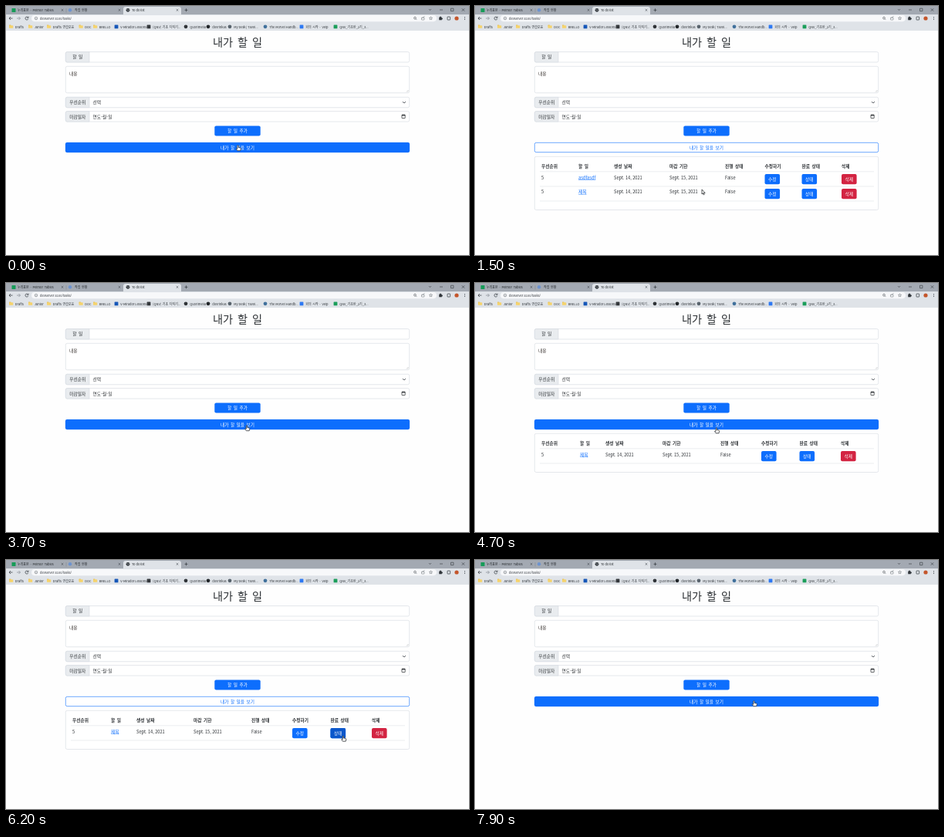
An HTML page with a canvas for the animation above (8 s loop, 600 px wide and 323 px high).

```html
<!DOCTYPE html>
<html lang="ko">
<head>
<meta charset="utf-8">
<title>To do list</title>
<style>
html, body { margin: 0; width: 100%; height: 100%; overflow: hidden; background: #fefefe; }
canvas { display: block; width: 600px; height: 323px; }
</style>
</head>
<body>
<canvas id="stage"></canvas>
<script>
const W = 600, H = 323, LOOP = 8000;
const canvas = document.getElementById('stage');
const ctx = canvas.getContext('2d');
const dpr = Math.max(1, window.devicePixelRatio || 1);
canvas.width = W * dpr;
canvas.height = H * dpr;

const BLUE = '#0d6efd', INK = '#2b2f33', LINE = '#d3d9df';
const VIEW = [77, 177, 446, 13];

// Pointer tip: time, x, y
const PATH = [
  [0, 300.5, 180.5], [850, 300.5, 180.5], [1200, 297, 214], [1500, 294, 238],
  [1750, 295, 238.5], [2200, 484, 224], [2700, 484, 224], [3100, 415, 221],
  [3400, 330, 185], [3700, 312, 184.5], [4600, 312, 184.5], [5000, 317, 204],
  [5500, 392, 227], [6100, 437, 228], [6650, 437, 228], [6950, 424, 238],
  [7500, 377, 209], [7850, 361.5, 182.5], [8000, 361.5, 182.5]
];

const LISTS = [
  { cols: [86, 134, 180, 252, 324, 375.5, 423.5, 475], rows: ['asdfasdf', '제목'],
    from: 180, to: 3250, press: 2600, pick: 7 },
  { cols: [86, 136, 169, 243, 318, 371, 420.5, 474], rows: ['제목'],
    from: 4020, to: 7250, press: 6400, pick: 6 }
];
const HEADS = ['우선순위', '할 일', '생성 날짜', '마감 기한', '진행 상태', '수정하기', '완료 상태', '삭제'];
const ACTIONS = { 5: '수정', 6: '상태', 7: '삭제' };

const clamp = (v, a = 0, b = 1) => Math.min(b, Math.max(a, v));
const ease = p => p * p * (3 - 2 * p);
const within = (t, a, b) => t >= a && t < b;

function pointer(t) {
  let i = 1;
  while (i < PATH.length - 1 && PATH[i][0] <= t) i++;
  const [t0, x0, y0] = PATH[i - 1], [t1, x1, y1] = PATH[i];
  const p = ease(clamp((t - t0) / (t1 - t0)));
  return [x0 + (x1 - x0) * p, y0 + (y1 - y0) * p];
}

function over([x, y, w, h], t) {
  const [px, py] = pointer(Math.max(0, t));
  return px >= x && px <= x + w && py >= y && py <= y + h;
}

// Hover amount, softened over a short fade
function heat(box, t) {
  let n = 0;
  for (let i = 0; i < 5; i++) n += over(box, t - i * 30);
  return n / 5;
}

function text(s, x, y, size = 5.7, color = INK, align = 'left', weight = 400) {
  ctx.font = `${weight} ${size}px "Noto Sans CJK KR", "Noto Sans CJK", "Noto Sans CJK JP", sans-serif`;
  ctx.wordSpacing = /[가-힣]/.test(s) ? size * 0.2 + 'px' : '0px';
  ctx.textAlign = align;
  ctx.textBaseline = 'middle';
  ctx.fillStyle = color;
  ctx.fillText(s, x, y);
}

function rect(x, y, w, h, r, fill, stroke, lw = 0.6) {
  ctx.beginPath();
  ctx.roundRect(x, y, w, h, r);
  if (fill) { ctx.fillStyle = fill; ctx.fill(); }
  if (stroke) { ctx.strokeStyle = stroke; ctx.lineWidth = lw; ctx.stroke(); }
}

function dot(x, y, r, fill) {
  ctx.beginPath();
  ctx.arc(x, y, r, 0, Math.PI * 2);
  ctx.fillStyle = fill;
  ctx.fill();
}

function ring(x, y, r, color, a = 0, b = Math.PI * 2, lw = 0.7) {
  ctx.beginPath();
  ctx.arc(x, y, r, a, b);
  ctx.strokeStyle = color;
  ctx.lineWidth = lw;
  ctx.stroke();
}

function line(color, lw, ...p) {
  ctx.beginPath();
  for (let i = 0; i < p.length; i += 2) ctx.lineTo(p[i], p[i + 1]);
  ctx.strokeStyle = color;
  ctx.lineWidth = lw;
  ctx.stroke();
}

function cross(x, y, r, color, lw = 0.6) {
  line(color, lw, x - r, y - r, x + r, y + r);
  line(color, lw, x - r, y + r, x + r, y - r);
}

function tabs(loading) {
  rect(0, 0, W, 12, 0, '#a3a9b2');
  rect(152, 1, 75, 13, [3, 3, 0, 0], '#dfe3e8');
  rect(7.5, 3, 5, 5, 0.5, '#169c58');
  text('누리표본 - Pelmor Tables', 15, 5.3, 4, '#24282c');
  cross(73, 5.3, 1.3, '#41464c');
  line('#7c828a', 0.5, 78, 3, 78, 8.5);
  dot(83, 5.3, 2.2, '#6d93cf');
  text('작업 현황', 89, 5.3, 4, '#24282c');
  cross(147, 5.3, 1.3, '#41464c');
  if (!loading) {
    dot(158, 5.3, 2.4, '#33383d');
    line('#dfe3e8', 0.5, 156.5, 4.5, 158.2, 5.6, 159.8, 4.8);
  }
  text('To do list', 163, 5.3, 4, '#24282c');
  cross(222, 5.3, 1.3, '#41464c');
  line('#30353a', 0.7, 231.5, 5.3, 235.5, 5.3);
  line('#30353a', 0.7, 233.5, 3.3, 233.5, 7.3);
  line('#30353a', 0.6, 548, 4, 549.5, 5.5, 551, 4);
  line('#30353a', 0.6, 562, 5, 566, 5);
  rect(576.5, 3.2, 3.4, 3.4, 0, null, '#30353a');
  cross(592.5, 5, 1.7, '#30353a');
}

function toolbar(loading) {
  rect(0, 11, W, 21, 0, '#dfe3e8');
  const c = '#3f454b';
  line(c, 0.8, 8.5, 16, 4, 16);
  line(c, 0.8, 6, 14, 4, 16, 6, 18);
  line('#8d949b', 0.8, 14, 16, 18.5, 16);
  line('#8d949b', 0.8, 16.5, 14, 18.5, 16, 16.5, 18);
  if (loading) cross(27, 16, 1.8, c, 0.8);
  else {
    ring(27, 16, 2, c, 0.4, 5.5, 0.8);
    line(c, 0.8, 29, 13.6, 29, 15.4, 27.2, 15.4);
  }
  rect(33, 12, 525, 8.2, 4.1, '#f7f8fa');
  ring(39, 16, 1.8, '#555b61', 0, 7, 0.5);
  line('#555b61', 0.5, 39, 15.6, 39, 17);
  text('devserver:4100/tasks/', 44, 16, 4, '#34393e');
  ring(530, 15.6, 1.4, c, 0, 7, 0.6);
  line(c, 0.6, 531, 16.6, 532.2, 17.8);
  rect(538.5, 15, 3.5, 3, 0.4, null, '#5b6167', 0.5);
  line('#5b6167', 0.5, 539.5, 15.5, 542.5, 13.5);
  ctx.beginPath();
  for (let i = 0; i < 10; i++) {
    const a = i * Math.PI / 5 - Math.PI / 2, r = i % 2 ? 1 : 2.2;
    ctx.lineTo(550.5 + r * Math.cos(a), 16 + r * Math.sin(a));
  }
  ctx.closePath();
  ctx.strokeStyle = '#5b6167';
  ctx.lineWidth = 0.5;
  ctx.stroke();
  rect(561.2, 14.6, 3.6, 3.6, 0.5, '#30353a');
  dot(563, 14.4, 0.9, '#30353a');
  dot(565, 16.4, 0.9, '#30353a');
  rect(572, 14, 3.6, 4, 0.4, null, '#30353a', 0.7);
  dot(584, 16, 2.6, '#c4562c');
  for (let i = -1; i < 2; i++) dot(594.5, 16 + i * 1.6, 0.5, c);
}

function folder(x, s) {
  rect(x - 2.5, 24.6, 2.5, 2, 0.5, '#e8bd4c');
  rect(x - 2.5, 25.2, 5.2, 3.6, 0.5, '#f5d36d');
  text(s, x + 5.2, 27, 4, '#2d3237');
}

function bookmark(x, color, s, square) {
  if (square) rect(x - 2.4, 24.4, 4.8, 4.8, 0.5, color);
  else dot(x, 26.8, 2.4, color);
  text(s, x + 5.2, 27, 4, '#2d3237');
}

function bookmarks() {
  folder(6.5, 'Drafts');
  folder(31.5, 'Junior');
  folder(55.5, 'Drafts 연습모음');
  folder(97, 'DOC');
  folder(115.5, 'BRELLO');
  bookmark(143, '#1657b8', 'V-Mirador Lessons', true);
  bookmark(185, '#34383c', '[QNV] 기초 다지기...', true);
  bookmark(233, '#2f3337', 'Quorimella');
  bookmark(262, '#22262a', 'dovrinkas');
  bookmark(290, '#59646e', 'My Desk | Tavol...');
  bookmark(336, '#41719c', 'The Morvel Handb...');
  bookmark(383, '#2d79f3', '회의 시작 - Velp', true);
  bookmark(427, '#1b9e5a', 'QNV_기초반_2기_3...', true);
}

function field(y, label) {
  rect(77.3, y, 445.4, 13.4, 2, '#fff', LINE);
  rect(77.3, y, 30.7, 13.4, [2, 0, 0, 2], '#e9ecef', LINE);
  text(label, 92.7, y + 6.8, 5.7, INK, 'center');
}

function form() {
  text('내가 할 일', 300, 46.3, 14.2, INK, 'center');
  field(59.5, '할 일');
  rect(77.3, 78.3, 445.4, 34.4, 2, '#fff', LINE);
  text('내용', 82, 88.2, 5.7, '#3b3531');
  line('#8a8f94', 0.4, 519, 111.5, 521.5, 109);
  line('#8a8f94', 0.4, 520.5, 111.5, 521.5, 110.5);
  field(118.3, '우선순위');
  text('선택', 112.5, 125.2);
  line('#343a40', 0.8, 514, 124, 516, 126, 518, 124);
  field(136.6, '마감일자');
  text('연도-월-일', 112.5, 143.5);
  rect(513, 141.2, 4.2, 4.4, 0.4, null, '#202428', 0.7);
  line('#202428', 1.2, 513, 141.7, 517.2, 141.7);
  rect(270.3, 155.5, 59.4, 13, 2, BLUE);
  text('할 일 추가', 300, 162, 5.7, '#fff', 'center');
}

function viewButton(t) {
  const [x, y, w, h] = VIEW, k = heat(VIEW, t);
  const down = within(t, 100, 200) || within(t, 4000, 4100);
  rect(x + 0.3, y + 0.3, w - 0.6, h - 0.6, 2, '#fff', BLUE);
  ctx.globalAlpha = k;
  rect(x, y, w, h, 2, down ? '#0a58ca' : BLUE);
  ctx.globalAlpha = 1;
  text('내가 할 일을 보기', 300, y + 6.5, 5.7, k > 0.5 ? '#fff' : BLUE, 'center');
}

const actionBox = (list, row, col) => [list.cols[col], 218 + row * 19, 19.6, 13.2];

function action(list, row, col, t) {
  const box = actionBox(list, row, col), red = col === 7;
  const [x, y, w, h] = box;
  const chosen = row === 0 && col === list.pick && t >= list.press;
  if (chosen) rect(x - 0.6, y - 0.6, w + 1.2, h + 1.2, 2.4, red ? 'rgba(211,36,66,.3)' : 'rgba(13,110,253,.3)');
  rect(x, y, w, h, 2, red ? '#d32442' : BLUE);
  ctx.globalAlpha = chosen ? 1 : heat(box, t);
  rect(x, y, w, h, 2, red ? '#af1c37' : '#0b57cb');
  ctx.globalAlpha = 1;
  text(ACTIONS[col], x + w / 2, y + h / 2, 5.7, '#fff', 'center');
}

function panel(list, t) {
  const c = list.cols, tall = 32 + 19 * list.rows.length;
  const open = ease(clamp((t - list.from) / 370));
  ctx.save();
  ctx.beginPath();
  ctx.rect(76, 194.5, 448, (tall + 1) * open);
  ctx.clip();
  rect(77.3, 195.3, 445.4, tall - 0.8, 2, '#fff', LINE);
  HEADS.forEach((s, i) => text(s, c[i], 208.2, 5.7, INK, 'left', 700));
  line('#dee2e6', 0.6, 84, 214.8, 517, 214.8);
  list.rows.forEach((name, r) => {
    const y = 222.5 + r * 18.8;
    text('5', c[0], y);
    text(name, c[1], y, 5.7, BLUE);
    const w = ctx.measureText(name).width;
    line(BLUE, 0.5, c[1], y + 3, c[1] + w, y + 3);
    text('Sept. 14, 2021', c[2], y);
    text('Sept. 15, 2021', c[3], y);
    text('False', c[4], y);
    for (const col of [5, 6, 7]) action(list, r, col, t);
    line('#dee2e6', 0.6, 84, 234 + r * 19, 517, 234 + r * 19);
  });
  ctx.restore();
}

function shape(x, y, path) {
  ctx.save();
  ctx.translate(x, y);
  ctx.lineJoin = 'round';
  ctx.fillStyle = '#fff';
  ctx.strokeStyle = '#16191c';
  ctx.lineWidth = 0.7;
  ctx.fill(path);
  ctx.stroke(path);
  ctx.restore();
}

const ARROW = new Path2D('M0 0V6L1.4 4.8L2.3 6.9L3.2 6.5L2.3 4.5H4.2Z');
const HAND = new Path2D('M-.7 .6Q0-.4 .7 .6V3L3.2 3.5Q4 3.8 3.8 5L3.2 7.2H-.6L-2.3 4.8Q-2.2 3.8-.7 4.8Z');

function cursor(t, list) {
  const [x, y] = pointer(t);
  const boxes = [VIEW];
  if (list) list.rows.forEach((_, r) => [5, 6, 7].forEach(c => boxes.push(actionBox(list, r, c))));
  shape(x, y, boxes.some(b => over(b, t)) ? HAND : ARROW);
}

function draw(t) {
  const list = LISTS.find(l => within(t, l.from, l.to));
  const loading = within(t, 2650, 3250) || within(t, 6700, 7250);
  ctx.setTransform(dpr, 0, 0, dpr, 0, 0);
  rect(0, 0, W, H, 0, '#fefefe');
  tabs(loading);
  toolbar(loading);
  bookmarks();
  form();
  viewButton(t);
  if (list) panel(list, t);
  cursor(t, list);
}

const start = performance.now();
function tick() {
  draw((performance.now() - start) % LOOP);
  requestAnimationFrame(tick);
}
tick();
</script>
</body>
</html>
```
